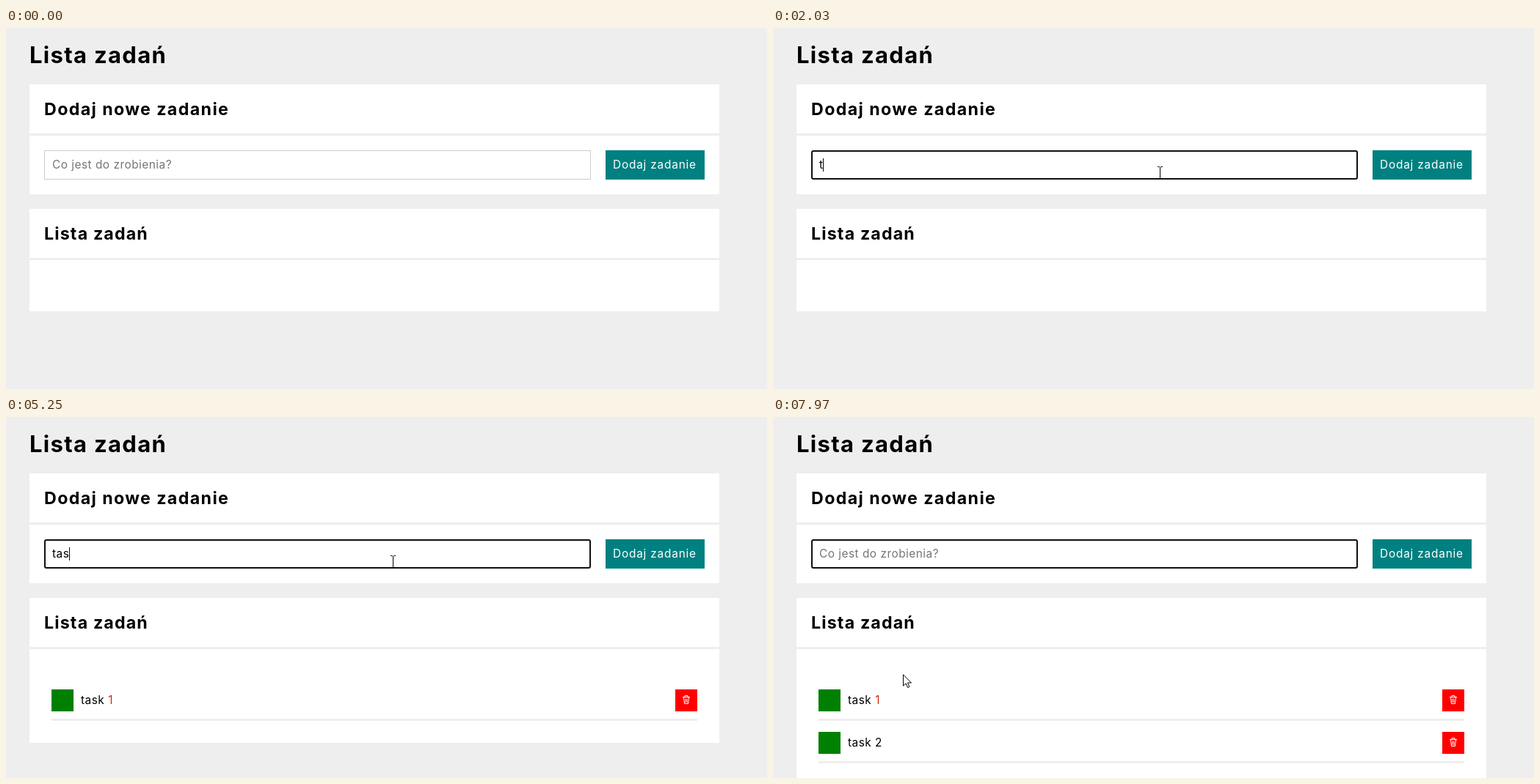
An HTML page for the animation above (8000 ms loop, 1037 by 493 pixels).

```html
<!DOCTYPE html>
<html lang="pl">
<head>
<meta charset="utf-8">
<title>Lista zadań</title>
<style>
  html, body { margin: 0; width: 100%; height: 100%; overflow: hidden; background: #eee; }
  svg { display: block; width: 100%; height: 100%; }
  text { font: 400 15.4px Inter, "Open Sans", sans-serif; letter-spacing: .032em; white-space: pre; }
  .title { font-size: 31px; font-weight: 700; letter-spacing: .042em; }
  .heading { font-size: 23.2px; font-weight: 700; letter-spacing: .05em; }
  .wide { letter-spacing: .06em; }
  .button { fill: #fff; letter-spacing: .052em; }
  .panel { fill: #fff; }
</style>
</head>
<body>
<svg viewBox="0 0 1037 493">
  <defs>
    <g id="row">
      <path fill="#008000" d="M62 372h30v30h-30z"/>
      <path fill="#f00" d="M912 372h30v30h-30z"/>
      <path fill="#eee" d="M62 412h880v3h-880z"/>
      <path fill="none" stroke="#fff" d="M922 382.5h10M925 382v-1.500h4v1.500M923.500 383l1 8.500h5l1-8.500M926 384.500v5.500M928 384.500v5.500"/>
    </g>
  </defs>
  <rect width="1037" height="493" fill="#eee"/>
  <text class="title" x="32" y="48">Lista zadań</text>
  <path class="panel" d="M32 77h940v67h-940zM32 147h940v80h-940zM32 247h940v67h-940z"/>
  <rect class="panel" id="list" x="32" y="317" width="940" height="70"/>
  <text class="heading wide" x="52" y="119">Dodaj nowe zadanie</text>
  <text class="heading" x="52" y="289">Lista zadań</text>

  <rect id="field" fill="#fff"/>
  <text id="entry" x="63" y="192"></text>
  <path id="squiggle" fill="none" stroke="#e8414a" stroke-width=".9"/>
  <rect id="caret" y="178" width="1" height="18"/>
  <path fill="#008080" d="M817 167h135v40h-135z"/>
  <text class="button" x="827" y="192">Dodaj zadanie</text>

  <g id="first"><use href="#row"/><text x="102" y="392">task <tspan fill="#d02c10">1</tspan></text></g>
  <g id="second" transform="translate(0 58)"><use href="#row"/><text x="102" y="392">task 2</text></g>

  <path id="arrow" fill="#fff" stroke="#000" stroke-linejoin="miter" d="M.5.8v15.400l3.600-3.400 2.500 5.700 2.300-1-2.400-5.500h5z"/>
  <path id="beam" fill="none" stroke="#000" d="M-3 -7.500h2.500l1 1 1-1h2.500M.5 -7v15M-3 8.500h2.500l1-1 1 1h2.500"/>
</svg>
<script>
const LOOP = 8000;
const FOCUS = 1650, ADD_FIRST = 3910, ADD_SECOND = 6700;
const HINT = "Co jest do zrobienia?";

// Each entry holds from its time until the next one.
const typing = [
  [0, ""], [2030, "t"], [2430, "ta"], [2630, "tas"], [2840, "task"], [3200, "task "], [3440, "task 1"],
  [ADD_FIRST, ""], [4720, "t"], [4970, "ta"], [5250, "tas"], [5370, "task"], [5780, "task "], [6050, "task 2"],
  [ADD_SECOND, ""]
];
const caretStates = [
  [0, false], [FOCUS, true], [ADD_FIRST, false], [4440, true], [6580, false], [7090, true], [7620, false]
];
const pointer = [
  [0, null], [700, [776, 381]], [780, [630, 276]], [850, [548, 220]],
  [1090, [546, 218]], [1140, [540, 212]], [1190, [533, 205]], [1240, [528, 201]],
  [1290, [528, 200]], [1360, [527, 198]], [1430, [527, 197]],
  [7490, [490, 214]], [7560, [405, 250]], [7620, [325, 284]], [7690, [269, 305]],
  [7900, [205, 337]], [7970, [177, 351]]
];

const el = Object.fromEntries([...document.querySelectorAll("svg [id]")].map(node => [node.id, node]));
const at = (keys, t) => keys.findLast(([time]) => time <= t)[1];
const show = (node, visible) => node.setAttribute("visibility", visible ? "visible" : "hidden");
const set = (node, attributes) => {
  for (const name in attributes) node.setAttribute(name, attributes[name]);
};

let wave = "M63 194.500";
for (let x = 65; x <= 97; x += 2) wave += `L${x} ${x % 4 === 1 ? 193.2 : 195.2}`;
el.squiggle.setAttribute("d", wave);

function drawField(t) {
  const text = at(typing, t);
  const focused = t >= FOCUS;
  set(el.field, focused
    ? { x: 53, y: 168, width: 743, height: 38, rx: 2, stroke: "#101010", "stroke-width": 2 }
    : { x: 52.5, y: 167.5, width: 744, height: 39, rx: 0, stroke: "#ccc", "stroke-width": 1 });
  const label = text || HINT;
  if (el.entry.textContent !== label) el.entry.textContent = label;
  el.entry.setAttribute("fill", text ? "#000" : "#757575");
  el.caret.setAttribute("x", text ? Math.round(62.5 + el.entry.getComputedTextLength()) : 63);
  show(el.caret, at(caretStates, t));
  show(el.squiggle, text.length > 4 && t >= 3240);
}

function drawPointer(t) {
  const position = at(pointer, t);
  const overField = position && position[1] < 207;
  show(el.arrow, position && !overField);
  show(el.beam, overField);
  if (position) set(overField ? el.beam : el.arrow, { transform: `translate(${position})` });
}

function draw(now) {
  const t = now % LOOP;
  const count = (t >= ADD_FIRST) + (t >= ADD_SECOND);
  el.list.setAttribute("height", 70 + 58 * count);
  show(el.first, count > 0);
  show(el.second, count > 1);
  drawField(t);
  drawPointer(t);
  requestAnimationFrame(draw);
}
draw(performance.now());
</script>
</body>
</html>
```
